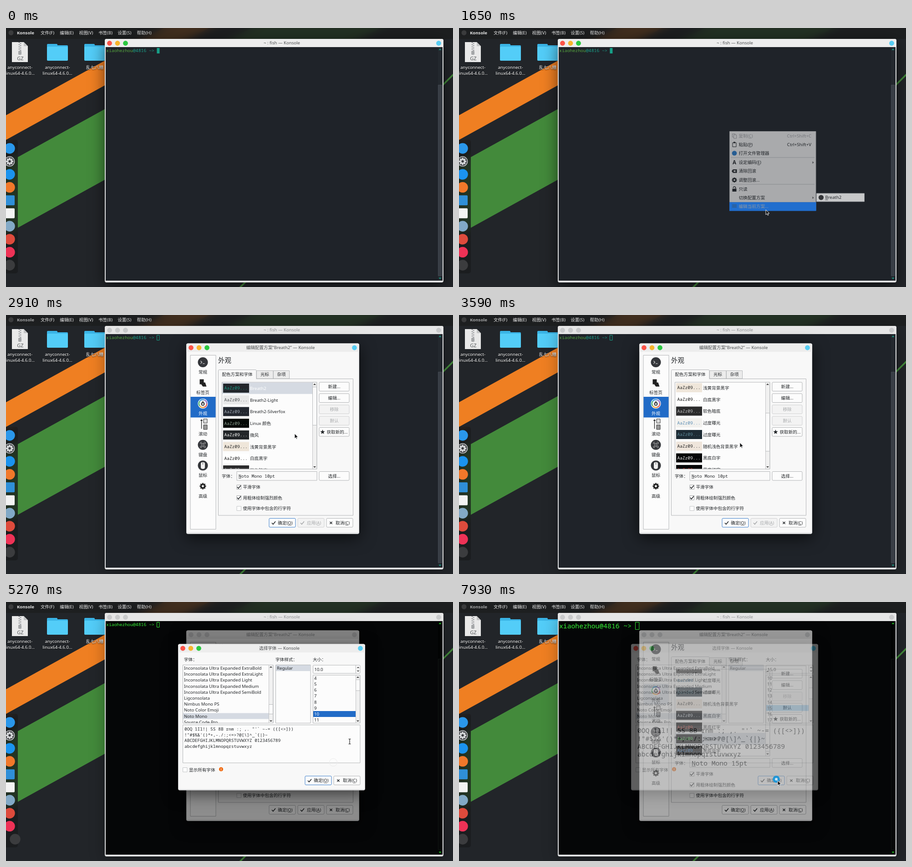
An HTML page with a canvas that plays this animation: 982 px wide and 570 px high, repeating every 7990 ms.

```html
<!DOCTYPE html>
<html lang="zh-CN">
<head>
<meta charset="utf-8">
<title>Konsole</title>
<style>
html, body { margin: 0; width: 100%; height: 100%; overflow: hidden; background: #222529; }
canvas { display: block; }
</style>
</head>
<body>
<canvas id="stage" width="982" height="570"></canvas>
<script>
const W = 982, H = 570, LOOP = 7990, TAU = Math.PI * 2;
const main = document.getElementById('stage').getContext('2d');
const layerCanvas = document.createElement('canvas');
layerCanvas.width = W;
layerCanvas.height = H;
const layer = layerCanvas.getContext('2d');
let g = main;

const SANS = '"Noto Sans", "Noto Sans CJK SC", "Noto Sans CJK", sans-serif';
const MONO = '"Noto Sans Mono", "DejaVu Sans Mono", monospace';
const INK = '#232629', BLUE = '#216bc7', IDLE = '#d5dae2', LINE = '#b4b6b8';

const ramp = (t, a, b) => Math.min(1, Math.max(0, (t - a) / (b - a)));
const ease = p => p * p * (3 - 2 * p);

// ---- drawing helpers ----
function text(s, x, y, o = {}) {
  const { color = INK, size = 9.6, align = 'left', weight = 400, mono } = o;
  g.font = `${weight} ${size}px ${mono ? MONO : SANS}`;
  g.textAlign = 'left';
  g.fillStyle = color;
  // '&' marks the underlined key
  const key = o.plain ? -1 : s.indexOf('&');
  if (key >= 0) s = s.replace('&', '');
  const w = g.measureText(s).width;
  x -= align === 'center' ? w / 2 : align === 'right' ? w : 0;
  const base = y + size * 0.36;
  g.fillText(s, x, base);
  if (key >= 0) {
    const from = g.measureText(s.slice(0, key)).width;
    g.fillRect(x + from, base + 1.2, g.measureText(s[key]).width, 0.8);
  }
}

function box(x, y, w, h, fill, stroke, r = 0) {
  g.beginPath();
  const d = stroke ? 0.5 : 0;
  g.roundRect(x + d, y + d, w - 2 * d, h - 2 * d, r);
  if (fill) { g.fillStyle = fill; g.fill(); }
  if (stroke) { g.strokeStyle = stroke; g.lineWidth = 1; g.stroke(); }
}

function disc(x, y, r, color) {
  g.fillStyle = color;
  g.beginPath();
  g.arc(x, y, r, 0, TAU);
  g.fill();
}

function poly(points, color) {
  g.fillStyle = color;
  g.beginPath();
  points.forEach(([x, y]) => g.lineTo(x, y));
  g.closePath();
  g.fill();
}

function path(points, color, width) {
  g.strokeStyle = color;
  g.lineWidth = width;
  g.beginPath();
  points.forEach(([x, y]) => g.lineTo(x, y));
  g.stroke();
}

function clipped(x, y, w, h, fn, r = 0) {
  g.save();
  g.beginPath();
  g.roundRect(x, y, w, h, r);
  g.clip();
  fn();
  g.restore();
}

function fade(alpha, dim, fn) {
  if (alpha <= 0) return;
  if (alpha >= 1 && dim <= 0) return fn();
  layer.clearRect(0, 0, W, H);
  g = layer;
  fn();
  g.globalCompositeOperation = 'source-atop';
  g.fillStyle = `rgba(0,0,0,${dim})`;
  g.fillRect(0, 0, W, H);
  g.globalCompositeOperation = 'source-over';
  g = main;
  g.globalAlpha = alpha;
  g.drawImage(layerCanvas, 0, 0);
  g.globalAlpha = 1;
}

function gear(x, y, r, color, hole) {
  for (let i = 0; i < 4; i++) {
    g.save();
    g.translate(x, y);
    g.rotate(i * Math.PI / 4);
    g.fillStyle = color;
    g.fillRect(-r * 0.22, -r, r * 0.44, r * 2);
    g.restore();
  }
  disc(x, y, r * 0.76, color);
  disc(x, y, r * 0.34, hole);
}

const tick = (x, y, c = INK) => path([[x - 4, y], [x - 1.2, y + 3], [x + 4, y - 3.2]], c, 1.6);

function cross(x, y) {
  path([[x - 2.6, y - 2.6], [x + 2.6, y + 2.6]], INK, 1.4);
  path([[x + 2.6, y - 2.6], [x - 2.6, y + 2.6]], INK, 1.4);
}

function star(x, y, r) {
  poly(Array.from({ length: 10 }, (_, i) => {
    const a = -Math.PI / 2 + i * Math.PI / 5, q = i % 2 ? r * 0.42 : r;
    return [x + q * Math.cos(a), y + q * Math.sin(a)];
  }), INK);
}

const arrow = (x, y, d, c = '#444') => poly([[x - 3, y - d * 1.5], [x + 3, y - d * 1.5], [x, y + d * 1.8]], c);
const side = (x, y, c) => poly([[x - 1.5, y - 2.8], [x + 1.6, y], [x - 1.5, y + 2.8]], c);

function button(x, y, w, label, o = {}) {
  const color = o.off ? '#a6a8aa' : INK;
  box(x, y, w, 20.5, o.off ? '#f3f3f3' : '#fcfcfc', o.main ? '#3d7fcb' : o.off ? '#cfd0d1' : '#b2b4b6', 2);
  const cy = y + 10.5;
  text(label, x + w / 2 + (o.icon ? 6.5 : 0), cy, { color, align: 'center' });
  if (o.icon === 'tick') tick(x + 10.5, cy, color);
  if (o.icon === 'cross') cross(x + 10.5, cy);
  if (o.icon === 'star') star(x + 8, cy, 5.5);
}

function check(x, y, label, on) {
  box(x, y - 5, 10.5, 10.5, '#fdfdfd', on ? '#a2a4a6' : '#c4c6c8');
  if (on) tick(x + 5.3, y, INK);
  text(label, x + 14, y + 0.5);
}

function scrollbar(x, y, h, top, len) {
  box(x, y, 10, h, '#f1f1f1', '#c2c4c6');
  box(x, top, 10, len, '#fafafa', '#b9bbbd');
  arrow(x + 5, y + 5, -1);
  arrow(x + 5, y + h - 5, 1);
}

function frame(x, y, w, h, title, active, shadow) {
  g.save();
  g.shadowColor = `rgba(0,0,0,${shadow})`;
  g.shadowBlur = 34;
  g.shadowOffsetY = 8;
  box(x, y, w, h, '#dfe0e1', null, 4);
  g.restore();
  box(x, y, w, 18.5, active ? '#ededed' : '#e6e6e6', null, [4, 4, 0, 0]);
  const lights = active ? ['#fb5448', '#f6b42c', '#2bc840', '#58cdf3'] : Array(4).fill('#c9cacb');
  lights.forEach((c, i) => disc(i < 3 ? x + 10.5 + i * 17.5 : x + w - 10.5, y + 9.5, 5.4, c));
  text(title, x + w / 2 + 17, y + 9, { align: 'center', color: active ? '#4a4c4e' : '#8c8e90' });
}

// ---- desktop ----
function stripe(y0, y1, color) {
  const drop = 0.553 * W;
  poly([[0, y0], [W, y0 - drop], [W, y1 - drop], [0, y1]], color);
}

function wallpaper() {
  g.fillStyle = '#222529';
  g.fillRect(0, 0, W, H);
  stripe(192, 246.3, '#ef7f22');
  stripe(298.5, 454, '#438a3b');
  path([[510, 575], [990, 95]], '#438a3b', 3.6);
}

// Panels show the wallpaper blurred beneath a dark tint.
function frosted(x, y, w, h, tint, r) {
  clipped(x, y, w, h, () => {
    g.filter = 'blur(9px)';
    wallpaper();
    g.filter = 'none';
    g.fillStyle = tint;
    g.fillRect(x, y, w, h);
  }, r);
}

function folder(x) {
  box(x, 35, 23, 14, '#3ab4e6', null, 2);
  box(x, 38, 46, 33, '#3ab4e6', null, 2);
  box(x, 41, 46, 31, '#53cdf8', null, 2);
}

function iconLabel(x, lines) {
  g.save();
  g.shadowColor = '#000';
  g.shadowBlur = 2;
  g.shadowOffsetY = 1;
  lines.forEach((s, i) => text(s, x, 86.5 + i * 13, { color: '#fff', align: 'center' }));
  g.restore();
}

function desktop(t, dimName) {
  wallpaper();
  frosted(0, 0, W, 24, 'rgba(29,30,31,0.82)');
  disc(11, 10.5, 5.5, '#3a3b3c');
  text('Konsole', 24, 10.5, { color: dimName ? '#a4a5a6' : '#e6e6e6', weight: 700 });
  ['文件(F)', '编辑(E)', '视图(V)', '书签(B)', '设置(S)', '帮助(H)'].forEach((s, i) =>
    text(s, 76 + i * 42.3, 11, { color: '#ececec' }));

  poly([[13, 31], [39, 31], [48, 40], [48, 75], [13, 75]], '#e9e9e9');
  poly([[39, 31], [48, 40], [39, 40]], '#c3c4c5');
  for (let i = 0; i < 8; i++) box(i % 2 ? 30.5 : 27.5, 31 + i * 2.4, 3, 1.8, '#8f9194');
  box(27, 50, 7, 9, '#a5a7a9', null, 2);
  text('GZ', 31.5, 67, { size: 11, align: 'center', color: '#55585b' });
  folder(90);
  folder(172);
  iconLabel(30.5, ['anyconnect-', 'linux64-4.6.0...']);
  iconLabel(113, ['anyconnect-', 'linux64-4.6.0...']);
  iconLabel(195, ['乱七八糟']);
  dock(t);
}

function dock(t) {
  frosted(-6, 246, 32, 294, 'rgba(26,27,28,0.76)', 5);
  const hop = t > 5090 && t < 5810 ? 12 * Math.abs(Math.sin(Math.PI * (t - 5090) / 360)) : 0;
  ['#2a97ea', '#3c3e41', '#1b93ee', '#f1782a', '#2f8fd8', '#f3f3f3', '#82a9c6', '#de4b3c', '#ee3256', '#3b3c3e']
    .forEach((c, i) => {
      const y = 265 + i * 28.55;
      if (i === 4 || i === 5) box(-4, y - 11, 23, 22, c, null, 2);
      else disc(8 + (i === 9 ? hop : 0), y, 11.7, c);
      if (i === 1) {
        g.strokeStyle = '#d5d7d9';
        g.lineWidth = 1.3;
        g.beginPath();
        g.arc(8, y, 10.5, 0, TAU);
        g.stroke();
        gear(8, y, 8, '#d5d7d9', '#3c3e41');
      }
    });
}

// ---- terminal ----
function terminal(t, active) {
  const black = t >= 3850, big = t >= 6900;
  frame(217, 24, 744, 536, '~ : fish — Konsole', active, active ? 0.55 : 0.3);
  box(219, 42, 740, 514, black ? '#050607' : '#1f2329');
  box(949, 42, 9, 514, black ? '#020303' : '#23282e');
  box(949, 125, 9, 421, black ? '#060808' : '#383d45', black ? '#101512' : '#414750');
  const tip = black ? '#1fc41f' : '#169a83';
  arrow(953.5, 47, -1, tip);
  arrow(953.5, 551, 1, tip);

  const step = big ? 8.84 : 5.89, size = step / 0.6, y = big ? 52.5 : 49.5;
  const user = 'xiaohezhou', lime = '#35f035';
  text(user, 220, y, { mono: 1, size, color: black ? lime : '#55a63f' });
  text('@4816 ~>', 220 + user.length * step, y, { mono: 1, size, color: black ? lime : '#1ba28b' });
  const x = 220 + 19 * step, h = big ? 17 : 12;
  if (active) box(x - 0.5, 44, 6, 12, '#17a088');
  else box(Math.floor(x - 0.5), 44, step + 0.5, h, null, black ? lime : '#17a088');
}

// ---- context menu ----
const MENU = [
  ['复制(&C)', 237.5, 'Ctrl+Shift+C'], ['粘贴(&P)', 256.5, 'Ctrl+Shift+V'], ['打开文件管理器', 275.5],
  ['设定编码(&E)', 296, '>'], ['清除回滚', 315], ['调整回滚...', 334.5],
  ['只读', 354.5], ['切换配置方案', 373.5, '>'], ['编辑当前方案...', 393]
];

function menuIcon(i, y, c) {
  const x = 605;
  if (i === 0) { box(x - 5, y - 5, 7, 8, null, c); box(x - 2, y - 3, 7, 9, '#f7f7f7', c); }
  if (i === 1) { box(x - 4.5, y - 4.5, 9, 10, null, c); box(x - 2, y - 6, 4, 3, c); }
  if (i === 2) disc(x, y, 5.3, '#2a7fd0');
  if (i === 3) text('A', x, y, { size: 11.5, weight: 700, align: 'center' });
  if (i === 4) {
    poly([[x - 6, y], [x - 3, y - 4], [x + 5.5, y - 4], [x + 5.5, y + 4], [x - 3, y + 4]], c);
    path([[x - 1.5, y - 2], [x + 2.5, y + 2]], '#fff', 1.2);
    path([[x + 2.5, y - 2], [x - 1.5, y + 2]], '#fff', 1.2);
  }
  if (i === 5) gear(x, y, 5.5, c, '#f7f7f7');
  if (i === 6) {
    box(x - 4.5, y - 1, 9, 6.5, c);
    g.strokeStyle = c;
    g.lineWidth = 1.4;
    g.beginPath();
    g.arc(x, y - 2.5, 2.8, Math.PI, TAU);
    g.lineTo(x + 2.8, y - 1);
    g.stroke();
  }
  if (i === 8) for (let k = -4; k <= 4; k += 2.7) box(x - 5, y + k - 0.6, 10, 1.2, c);
}

function menu(t) {
  const over = t < 700 ? -1 : t < 1150 ? 7 : 8, closing = t >= 1600;
  const left = t < 1640 ? 1 : 1 - ramp(t, 1670, 1780);
  const alpha = closing ? (t < 1640 ? 1 : 0.64 * left) : ramp(t, 540, 680);
  const mark = c => over >= 0 && box(594, MENU[over][1] - 9.5, 190.5, 19, c);
  fade(alpha, 0, () => {
    box(594, 227, 190.5, 174.5, '#f7f7f7', '#c2c4c6');
    mark(BLUE);
    [285, 344].forEach(y => box(597, y - 0.5, 184, 1, '#c4c6c8'));
    MENU.forEach(([s, y, extra], i) => {
      const color = i === over ? '#fff' : i === 0 ? '#a5a5a9' : INK;
      menuIcon(i, y, color);
      text(s, 614.5, y, { color });
      if (extra === '>') side(778, y, i === over ? '#fff' : '#666');
      else if (extra) text(extra, 774, y, { color, align: 'right' });
    });
  });
  if (alpha > 0 && closing && t >= 1640) {
    mark(`rgba(33,110,206,${left})`);
    menuIcon(8, 393, '#345577');
    text(MENU[8][0], 614.5, 393, { color: '#8f98a2' });
  }
  fade(closing ? 0.78 * left : ramp(t, 1010, 1120), 0, () => {
    box(785, 363.5, 106, 19, '#f7f7f7', '#c2c4c6');
    disc(795.5, 373, 5.6, '#3a3b3d');
    text('&Breath2', 804.5, 373);
  });
}

// ---- profile dialog ----
const SCHEMES = [
  ['Breath2', '#23272c', '#1b9c86'], ['Breath2-Light', '#e8e8e8', '#4a4d50'], ['Breath2-Silverfox', '#23272f', '#a9b3bd'],
  ['Linux 颜色', '#050a07', '#93a596'], ['微风', '#232629', '#fcfcfc'], ['浅黄背景黑字', '#efe6da', '#222'],
  ['白底黑字', '#fff', '#111'], ['软色暗底', '#2b2b2c', '#c4c4c4'], ['过度曝光', '#f2f1ee', '#5a8cb4'],
  ['过度曝光', '#1d2b34', '#5e8a99'], ['随机浅色背景黑字', '#efe5db', '#222'], ['黑底白字', '#050607', '#f4f4f4'],
  ['黑底红字', '#050607', '#d8392f'], ['黑底绿字', '#050607', '#32d23a'], ['黑底蓝字', '#050607', '#2d7bd2']
];

function sideIcon(i, y) {
  const x = 432.5, dark = '#34363a';
  if (i === 0 || i === 4) disc(x, y, 11, dark);
  if (i === 0) {
    path([[x - 5, y - 3], [x - 2, y], [x - 5, y + 3]], '#ddd', 1.1);
    path([[x - 0.5, y + 3], [x + 4, y + 3]], '#ddd', 1.1);
  }
  if (i === 1) {
    poly([[x - 7, y - 8], [x + 2, y - 8], [x + 2, y], [x + 4, y + 3], [x - 7, y + 3]], '#222');
    poly([[x - 3, y - 1], [x + 5, y - 1], [x + 8, y + 8], [x, y + 8], [x - 3, y + 4]], '#222');
  }
  if (i === 2) {
    disc(x, y, 11, '#f4f4f4');
    ['#e8554e', '#f2a33a', '#46b26b', '#3a9be0', '#8a64c8'].forEach((c, k) => {
      g.strokeStyle = c;
      g.lineWidth = 2.2;
      g.beginPath();
      g.arc(x, y, 8.6, k * TAU / 5, (k + 1) * TAU / 5);
      g.stroke();
    });
    poly([[x, y - 6], [x + 4, y], [x - 4, y]], '#45484c');
    disc(x, y + 0.8, 4, '#45484c');
    disc(x, y + 1, 1.8, '#f4f4f4');
  }
  if (i === 3) {
    path([[x - 3, y - 9], [x - 3, y + 10]], '#222', 1.3);
    arrow(x - 3, y - 9, -1, '#222');
    box(x + 1, y - 12, 9, 10, '#ddd', '#333');
    box(x + 1, y + 1, 9, 11, '#999', '#333');
  }
  if (i === 4) text('⌘', x, y, { color: '#eee', size: 14, align: 'center' });
  if (i === 5) {
    disc(x, y, 11, dark);
    box(x - 4.5, y - 7.5, 9, 15, '#f0f0f0', null, 4);
    path([[x, y - 7], [x, y - 2]], '#555', 1);
  }
  if (i === 6) gear(x, y, 7, '#222', '#f8f8f8');
}

function generalPage() {
  text('常规', 466, 100, { size: 14.4 });
  [['配置方案名称：', 'Breath2'], ['命令：', '/usr/bin/fish'], ['初始目录：', '']].forEach(([s, v], i) => {
    const y = 132 + i * 27;
    text(s, 534, y, { align: 'right' });
    box(538, y - 10, 222, 20, '#fff', LINE, 2);
    text(v, 543, y);
  });
  check(538, 213, '在同一目录下打开新标签页', true);
  check(538, 236, '显示终端大小', true);
}

function lookPage(t, active) {
  const picked = t >= 3980;
  text('外观', 466, 100, { size: 14.4 });
  box(466, 140, 297, 301.5, '#f8f8f8', LINE);
  box(550, 122, 37.5, 18.5, '#ececec', LINE);
  box(587, 122, 36, 18.5, '#ececec', LINE);
  box(466, 120, 84.5, 21, '#f8f8f8', LINE, [2, 2, 0, 0]);
  box(467, 139, 82.5, 3, '#f8f8f8');
  text('配色方案和字体', 508, 131, { align: 'center' });
  text('光标', 568.5, 131, { align: 'center' });
  text('杂项', 605, 131, { align: 'center' });

  const p = Math.round(ramp(t, 3280, 3700) * 6) / 6, scroll = 194.3 * p;
  box(474, 147.5, 209.5, 192, '#fcfcfc', LINE);
  clipped(475, 148.5, 198, 190, () => SCHEMES.forEach(([name, bg, fg], i) => {
    const y = 161 + i * 25.72 - scroll, on = i === (picked ? 13 : 0), lit = on && active && picked;
    if (on) box(475, y - 13, 198, 25.7, lit ? BLUE : IDLE);
    box(477, y - 10, 57, 20, bg);
    text('AaZz09...', 479.5, y, { mono: 1, size: 9.5, color: fg });
    text(name, 536, y + 0.5, { color: on && (lit || !picked) ? '#fff' : INK });
  }));
  scrollbar(673, 147.5, 192, 158 + 86 * p, 85);
  ['新建...', '编辑...', '移除', '默认'].forEach((s, i) =>
    button(687.5, 147.5 + i * 25, 67, s, { off: i === 2 || (i === 3 && !picked) }));
  button(687.5, 247, 67, '获取新的...', { icon: 'star' });

  const big = t >= 6900;
  text('字体：', 474, 354.5);
  box(506.5, 344, 177, 20.5, '#fafafa', LINE);
  text(`&Noto Mono ${big ? 15 : 10}pt`, 511, 354.5, { mono: 1, size: big ? 14.6 : 9.5 });
  button(687.5, 344, 67, '选择...');
  check(506.5, 378.5, '平滑字体', true);
  check(506.5, 402, '用粗体绘制强烈颜色', true);
  check(506.5, 425.5, '使用字体中包含的行字符', false);
}

function profileDialog(t, active) {
  const look = t >= 2640, picked = t >= 3980, now = look ? 2 : 0;
  frame(396, 62.5, 380, 419.5, '编辑配置方案“Breath2” — Konsole', active, 0.65);
  box(397.5, 81, 377, 398, '#f8f8f8');
  box(404.5, 88, 57, 384, '#fcfcfc', LINE);
  ['常规', '标签页', '外观', '滚动', '键盘', '鼠标', '高级'].forEach((s, i) => {
    const y = 104 + i * 45.45, on = i === now, lit = on && !picked;
    if (on) box(405.5, y - 15, 55, 45.5, lit ? BLUE : IDLE);
    sideIcon(i, y);
    text(s, 432.5, y + 21.5, { align: 'center', weight: 500, color: lit ? '#fff' : INK });
  });
  look ? lookPage(t, active) : generalPage();
  button(577.5, 447, 59, '确定(&O)', { icon: 'tick', main: active });
  button(640.5, 447, 59, '应用(&A)', { icon: 'tick', off: t < 4100 });
  button(703.5, 447, 59, '取消(&C)', { icon: 'cross' });
}

// ---- font dialog ----
const FONTS = ['ExtraBold', 'ExtraLight', 'Light', 'Medium', 'SemiBold'].map(s => 'Inconsolata Ultra Expanded ' + s)
  .concat('Ligconsolata', 'Nimbus Mono PS', 'Noto Color Emoji', 'Noto Mono', 'Source Code Pro');
const SAMPLE = ['0OQ 1Il!| 5S 8B rnm :; ,. "\'` ~-= ({[<>]})', '!"#$%&\'()*+,-./:;<=>?@[\\]^_`{|}~',
  'ABCDEFGHIJKLMNOPQRSTUVWXYZ 0123456789', 'abcdefghijklmnopqrstuvwxyz'];

function fontDialog(t) {
  const big = t >= 6900, size = big ? 15 : 10, first = t < 5770 ? 4 : t < 5820 ? 7 : 10;
  frame(378, 92.5, 411, 322, '选择字体 — Konsole', true, 0.6);
  box(379.5, 111, 408, 301, '#f8f8f8');
  text('字体：', 391, 127);
  text('字体样式：', 592, 127);
  text('大小：', 674, 127);

  box(388, 138, 199.5, 129, '#fcfcfc', LINE);
  clipped(389, 139, 188, 127, () => FONTS.forEach((s, i) => {
    const y = 145.5 + i * 13.2;
    if (i === 8) box(389, y - 6.5, 188, 13, IDLE);
    text(s, 391, y);
  }));
  scrollbar(577, 138, 129, 225, 22);
  box(592, 138, 77.5, 129, '#fcfcfc', LINE);
  box(593, 139, 75.5, 13, IDLE);
  text('Regular', 595, 145.5);

  box(674, 138.5, 104.5, 19, '#fcfcfc', LINE, 2);
  text(size + '.0', 677.5, 148.5);
  path([[768.5, 139], [768.5, 157]], LINE, 1);
  arrow(773.5, 144, -0.8);
  arrow(773.5, 152, 0.8);
  box(674, 160.5, 104.5, 106.5, '#fcfcfc', LINE);
  clipped(675, 161.5, 93, 104.5, () => {
    for (let i = 0; i < 8; i++) {
      const y = 167.5 + i * 13.15, on = first + i === size, lit = on && t < 7700;
      if (on) box(675, y - 6.5, 93, 13, lit ? BLUE : '#9fd0f2');
      text(String(first + i), 677, y, { color: lit ? '#fff' : INK });
    }
  });
  scrollbar(768, 160.5, 106.5, 170.5 + (first - 4) * 3, 25);

  box(388, 270, 390.5, 84.5, '#fcfcfc', LINE);
  SAMPLE.forEach((s, i) => text(s, 392, big ? 283 + i * 17.4 : 280 + i * 12.4, { mono: 1, size: big ? 14.6 : 9.52, plain: 1 }));
  if (t < 5700) {
    g.strokeStyle = '#ececec';
    g.lineWidth = 1;
    g.beginPath();
    g.arc(719, 353, 8.5, 0, TAU);
    g.stroke();
  }
  check(388, 369, '显示所有字体', false);
  disc(472.5, 368, 4.6, '#f06a12');
  text('!', 472.5, 368, { color: '#fff', size: 7, weight: 700, align: 'center' });
  button(656.5, 382.5, 59, '确定(&O)', { icon: 'tick', main: true });
  button(719.5, 382.5, 59, '取消(&C)', { icon: 'cross' });
}

// ---- pointer ----
const MOVES = [
  [160, 640, -16], [520, 594, 227], [600, 594, 227], [820, 656, 366], [1010, 656, 366], [1420, 672, 391],
  [1600, 672, 391], [1650, 674, 400], [2400, 674, 400], [2620, 433, 200], [2680, 433, 200], [2900, 634, 261],
  [3280, 634, 261], [3850, 604, 296], [4150, 604, 296], [4780, 722, 353], [4990, 722, 353], [5260, 755, 307],
  [5300, 755, 307], [5700, 712, 246], [6100, 712, 246], [6580, 690, 231], [6950, 690, 231], [7560, 700, 393]
];

function pointer(t) {
  let i = MOVES.findIndex(m => m[0] > t);
  if (i === 0) return;
  if (i < 0) i = MOVES.length - 1;
  const [a, x0, y0] = MOVES[i - 1], [b, x1, y1] = MOVES[i], p = ease(ramp(t, a, b));
  const x = x0 + (x1 - x0) * p, y = y0 + (y1 - y0) * p;
  if (t > 5150 && y > 270 && y < 354) {
    path([[x - 2.5, y - 5.5], [x + 2.5, y - 5.5]], '#222', 1);
    path([[x, y - 5.5], [x, y + 5.5]], '#222', 1.2);
    path([[x - 2.5, y + 5.5], [x + 2.5, y + 5.5]], '#222', 1);
    return;
  }
  if (t >= 7900) {
    disc(x - 3, y - 3, 7.8, '#2196d6');
    disc(x - 3, y - 3, 3, '#c8e4f4');
  }
  g.save();
  g.translate(x, y);
  poly([[0, 0], [0, 11], [2.6, 8.6], [4.3, 12.3], [6, 11.5], [4.3, 8], [7.8, 8]], '#131416');
  g.strokeStyle = '#fff';
  g.lineWidth = 0.9;
  g.stroke();
  g.restore();
}

function draw(t) {
  const dialogOpen = t >= 1800, fontOpen = t >= 5010, closing = t >= 7930;
  desktop(t, dialogOpen && (!fontOpen || closing));
  terminal(t, !dialogOpen);
  if (t >= 540 && t < 1780) menu(t);
  if (dialogOpen) {
    const dim = closing ? 0.34 : 0.44 * ramp(t, 5010, 5250);
    fade(ramp(t, 1800, 2020), dim, () => profileDialog(t, !fontOpen));
  }
  if (fontOpen) fade(closing ? 0.4 : ramp(t, 5010, 5200), closing ? 0.08 : 0, () => fontDialog(t));
  pointer(t);
}

const start = performance.now();
function tickFrame() {
  draw((performance.now() - start) % LOOP);
  requestAnimationFrame(tickFrame);
}
tickFrame();
</script>
</body>
</html>
```
